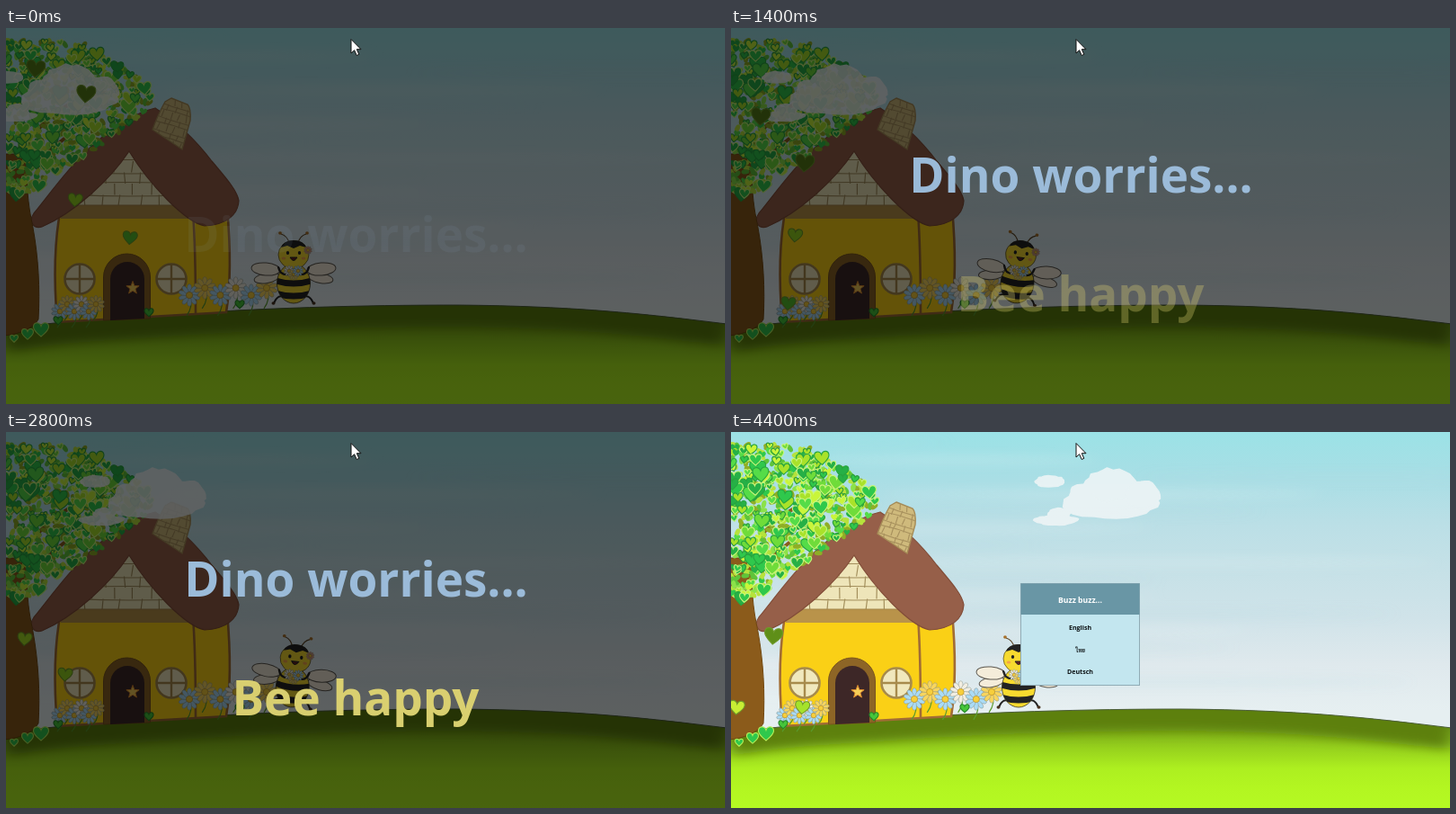
Recreate the animation shown at these times as an HTML page. Size 800 by 418 pixels, loop 4.5 s.

```html
<!DOCTYPE html>
<html lang="en">
<head>
<meta charset="utf-8">
<title>Bee happy</title>
<style>
  html, body { margin: 0; width: 100%; height: 100%; overflow: hidden; background: #c4e1e7; }
  svg { display: block; width: 800px; height: 418px; }
  text { font-family: "Open Sans", "Noto Sans", sans-serif; font-weight: 700; text-anchor: middle; }
  .big { font-size: 53px; }
  .item { font-size: 7.1px; fill: #0d1214; }
</style>
</head>
<body>
<svg id="stage" viewBox="0 0 800 418" xmlns="http://www.w3.org/2000/svg"></svg>
<script>
const LOOP = 4500, STEP = 100, CUT = 3500, SECOND = 1000, FLOOR = 306;
const BLUE = '#aadbf5', WHITE = '#f2eee2', GOLD = '#f8d55e';
const GREENS = ['#2fc84c', '#55dc48', '#a9e22a', '#c9f53a', '#6fdc3a', '#26b046'];
const stage = document.getElementById('stage');

let seed = 11;
const rnd = (a = 0, b = 1) => a + (b - a) * (seed = (seed * 16807) % 2147483647) / 2147483647;
const pick = list => list[Math.floor(rnd(0, list.length))];
const many = (n, make) => Array.from({ length: n }, (_, i) => make(i)).join('');

const path = (d, fill, stroke = 'none', w = 1, more = '') =>
  `<path d="${d}" fill="${fill}" stroke="${stroke}" stroke-width="${w}" ${more}/>`;
const oval = (x, y, rx, ry, fill, stroke = 'none', w = 1, more = '') =>
  `<ellipse cx="${x}" cy="${y}" rx="${rx}" ry="${ry}" fill="${fill}" stroke="${stroke}" stroke-width="${w}" ${more}/>`;
const rect = (x, y, w, h, fill, more = '') =>
  `<rect x="${x}" y="${y}" width="${w}" height="${h}" fill="${fill}" ${more}/>`;
const label = (x, y, s, cls, more = '') => `<text x="${x}" y="${y}" class="${cls}" ${more}>${s}</text>`;
const clip = (id, d) => `<clipPath id="${id}"><path d="${d}"/></clipPath>`;
const grad = (id, y1, y2, colors) =>
  `<linearGradient id="${id}" gradientUnits="userSpaceOnUse" x1="0" x2="0" y1="${y1}" y2="${y2}">` +
  colors.map((c, i) => `<stop offset="${i / (colors.length - 1)}" stop-color="${c}"/>`).join('') + '</linearGradient>';

const CREST = 'M-2 336C60 325 110 323 160 320C280 311 400 308 500 308C640 309 720 319 802 329';
const HILL = CREST + 'V420H-2Z';
const GABLE = 'M137 135L76 197H200Z';
const CHIMNEY = 'M184 78L202 85Q206 89 205 103L196 135L163 113Q169 96 177 82Z';
const HEART = 'M0 .95C-.45 .55-1 .15-1-.32C-1-.98-.2-1.02 0-.42C.2-1.02 1-.98 1-.32C1 .15 .45 .55 0 .95Z';

const heart = (x, y, r, fill, line = 'none', turn = 0) =>
  `<path d="${HEART}" transform="translate(${x} ${y}) rotate(${turn}) scale(${r})" fill="${fill}" stroke="${line}" stroke-width="${1.1 / r}"/>`;

function flower(x, y, r, color) {
  const petals = many(10, i =>
    oval(0, -r * .62, r * .2, r * .4, color, '#8a958c', .5, `transform="rotate(${i * 36})"`));
  return `<g transform="translate(${x} ${y})">${petals}${oval(0, 0, r * .3, r * .3, '#f7cf3c', '#b98a20', .6)}</g>`;
}

function sky() {
  const streaks = many(16, i =>
    oval(rnd(0, 800), 12 + i * 19, rnd(150, 350), 4, i % 2 ? '#edf5f6' : '#b4d9e2', 'none', 0, 'opacity=".25"'));
  return rect(0, 0, 800, 418, 'url(#sky)') + `<g filter="url(#soft)">${streaks}</g>`;
}

// The shade under the crest follows its curve.
function hill() {
  return path(HILL, 'url(#hill)') +
    `<g clip-path="url(#ground)">${path(CREST, 'none', '#5d8011', 48, 'filter="url(#soft)"')}</g>` +
    path(CREST, 'none', '#4c5d3c', 1);
}

function bricks(x0, y0, cols, rows, w, h, line) {
  return many(rows, r => {
    const y = y0 + r * h;
    return path(`M${x0} ${y}q${cols * w / 2} ${r % 2 ? 3 : -3} ${cols * w} 0` +
      many(cols, c => `M${x0 + (c + r % 2 / 2) * w + rnd(0, 5)} ${y}l${rnd(-2, 2)} ${h}`), 'none', line, 1.2);
  });
}

const windowAt = (x, y) => oval(x, y, 16.5, 16.5, '#f0e8bd', '#a78b4c', 2.6) +
  path(`M${x - 16} ${y}h32M${x} ${y - 16}v32`, 'none', '#a78b4c', 2.4);

function star(x, y, r) {
  const pts = Array.from({ length: 10 }, (_, i) => {
    const a = i * Math.PI / 5 - Math.PI / 2, k = i % 2 ? r * .42 : r;
    return `${x + k * Math.cos(a)} ${y + k * Math.sin(a)}`;
  });
  return path('M' + pts.join('L') + 'Z', '#f6cf58', '#d8862c', 1);
}

function house() {
  const wall = '#a16c35', arch = (x, top, w) => `M${x} 325V${top + w / 2}a${w / 2} ${w / 2} 0 0 1 ${w} 0V323Z`;
  return path('M61 200C54 235 53 280 57 327L211 318L245 316C250 285 250 245 246 200Z', '#fad016', wall, 2.6) +
    path('M208 205C211 245 211 285 211 318', 'none', wall, 2.6) +
    rect(61, 197, 147, 15, '#b9934a') +
    path(GABLE, '#eee5b9') + `<g clip-path="url(#gable)">${bricks(74, 148, 6, 4, 21, 12.5, '#a38f5c')}</g>` +
    path('M76 197H200', 'none', '#a3854a') +
    path('M40 221C30 224 25 214 31 206C52 180 72 152 100 127C122 108 145 94 166 89C185 101 209 122 229 148' +
      'C244 166 257 180 259 192C258 208 245 219 221 220C200 216 160 175 137 137C115 170 75 206 40 221Z', '#965f49', '#824d38', 1.2) +
    path(CHIMNEY, '#cfba7c', '#a58b56', 1.4) +
    `<g clip-path="url(#chimney)"><g transform="rotate(17 184 105)">${bricks(158, 79, 6, 8, 10, 7.5, '#a9925e')}</g></g>` +
    path(arch(108.5, 251, 52), '#8d6526', '#79541d') + path(arch(116, 260, 38), '#3d2727') +
    star(141, 289, 7.5) + windowAt(82, 279) + windowAt(184, 279);
}

function bed(x, width, n, y, r) {
  return many(n, i => {
    const fx = x + width * i / (n - 1), fy = y + (i % 2 ? -4 : 4);
    return path(`M${fx} ${fy}q5 ${r} -3 ${r * 1.9}`, 'none', '#5b9a2e', 1.2) +
      flower(fx, fy, r, [BLUE, GOLD, BLUE, WHITE][i % 4]);
  });
}

function garden() {
  return bed(60, 40, 6, 311, 9.5) + bed(204, 86, 6, 293, 12) +
    many(3, i => heart(39 - i * 15, 335 + i * 5, 8.5 - i * 2, '#2fc84c', '#b8f05a')) +
    many(3, i => heart(58 + i * 101, 325 - i * 9, 5, '#46c63a', '#25862a'));
}

// Right edge of the leaves at height y.
const reach = y => y < 85 ? 162 - 96 * ((85 - y) / 75) ** 2 : 162 - 150 * ((y - 85) / 107) ** 1.1;

function foliage(n, make) {
  return many(n, () => {
    let x, y;
    do { x = rnd(0, 162); y = rnd(12, 188); } while (x > reach(y));
    return make(x, y);
  });
}

function tree() {
  return path('M-2 140H24C22 170 24 195 30 222C36 255 38 290 36 324C30 334 16 340 -2 342Z', '#8b5b1b', '#70470f') +
    path('M8 165C16 135 35 105 70 85M20 170C35 140 68 125 95 96', 'none', '#8b5b1b', 4) +
    foliage(420, (x, y) => oval(x, y, 4.5, 2.6, pick(['#8fae26', '#8be24a', '#b6e23c', '#5fc43a']), 'none', 0,
      `transform="rotate(${rnd(0, 180)} ${x} ${y})"`)) +
    foliage(230, (x, y) => heart(x, y, rnd(3, 5), pick(GREENS), pick(['none', '#c9f57a', '#2a9a3c']), rnd(-15, 15))) +
    foliage(75, (x, y) => heart(x, y, rnd(5, 9), pick(GREENS), pick(['#c9f57a', '#27a43f']), rnd(-8, 8)));
}

function bee() {
  const ink = '#232323', yellow = '#f7da2f', wing = '#f4ecda';
  const side = s => `<g transform="translate(320 0) scale(${s} 1)">` +
    oval(30, 278, 14, 5.5, wing, '#5d5850', 1, 'transform="rotate(10 30 278)"') +
    oval(31, 268, 16, 7, wing, '#5d5850', 1, 'transform="rotate(-5 31 268)"') +
    path('M11 299Q18 296 22 306', 'none', ink, 2) + oval(22.5, 306, 2, 1.7, '#4a3320') +
    path('M5 239Q7 231 14 229', 'none', '#5a4325', 1.2) + oval(15, 228, 1.9, 1.7, '#a8702a') + '</g>';
  const face = s => oval(320 + s * 6.5, 250, 1.7, 2.1, ink) + oval(320 + s * 11, 256, 2.4, 1.6, '#f3a54a') +
    path(`M${320 + s * 17} 266q${-s * 2} 9 ${-s * 11} 8`, 'none', ink, 2.2, 'stroke-linecap="round"');
  const stripe = y => path(`M299 ${y}q21 7 42 0v7q-21 7 -42 0Z`, ink);
  return side(-1) + side(1) +
    oval(320, 284, 18.5, 22, yellow, '#3b351d', .8) +
    `<g clip-path="url(#belly)">${stripe(277)}${stripe(291)}</g>` +
    oval(320, 252, 17, 15.5, yellow, '#4a421e', .7) +
    path('M306 244Q309 236 320 236Q331 236 334 244L327 242L320 245L313 242Z', ink) +
    face(-1) + face(1) + path('M316 255Q320 262 324 255Z', '#6b2020', ink) +
    flower(336, 247, 4.5, '#e98b6a') +
    many(3, i => flower(315 + i * 5, 270 + i % 2 * 4, 6, [WHITE, GOLD, BLUE][i]));
}

// Ragged ellipse.
function puff(x, y, rx, ry) {
  const n = 26, pts = Array.from({ length: n }, (_, i) => {
    const a = i / n * 2 * Math.PI, k = rnd(.9, 1.06);
    return `${x + rx * k * Math.cos(a)} ${y + ry * k * Math.sin(a)}`;
  });
  return path('M' + pts.join('L') + 'Z', '#f0f5f6', '#f0f5f6', 2, 'stroke-linejoin="round"');
}

function cloud() {
  return puff(404, 79, 54, 17) + puff(404, 59, 28, 18) + puff(440, 70, 19, 16) + puff(372, 70, 13, 12) +
    puff(337, 55, 16, 6) + puff(344, 98, 24, 5) + puff(347, 92, 12, 7);
}

function menu() {
  return rect(322.5, 168.5, 132, 113, '#c3e6ef', 'stroke="#8fabb5"') +
    rect(322.5, 168.5, 132, 34.5, '#6996a5') +
    label(388.5, 190, 'Buzz buzz...', '', 'font-size="8.6" fill="#fff"') +
    ['English', 'ไทย', 'Deutsch'].map((s, i) => label(388.5, 220 + i * 24.6, s, 'item')).join('');
}

// Drifting leaves: start in ms, life in ms, start point, speed in px/s.
const leaf = (color, r, from, life, x, y, vx, vy) => ({ color, r, from, life, x, y, vx, vy });
const leaves = [
  leaf('#93d620', 8, 0, CUT, 77, 191, -4, 28),
  leaf('#55c22c', 8, 0, CUT, 138, 233, -53, 72),
  leaf('#567d16', 10.5, 0, 1500, 89, 73, -5, 55),
  leaf('#567d16', 10.5, 0, 1500, 33, 45, 0, 38),
  leaf('#a6df25', 8, 2600, 900, 26, 214, -26, 80),
  leaf('#5f8f18', 10, CUT, 1000, 49, 187, -2, 44),
  leaf('#c8ee34', 8.5, CUT, 1000, 28, 234, -24, 82),
  leaf('#a5e32b', 8, CUT, 1000, 83, 291, -4, 34)
];

stage.innerHTML = '<defs>' +
  grad('sky', 0, 310, ['#9be2e6', '#a9dee5', '#bbdfe6', '#c6e1e7', '#d0e3e9', '#dfe9ed', '#e6eff1']) +
  grad('hill', 308, 418, ['#6a9415', '#7cac18', '#97d21d', '#adef20', '#b3f621', '#b5f923']) +
  '<filter id="soft" filterUnits="userSpaceOnUse" x="-50" y="-50" width="900" height="520"><feGaussianBlur stdDeviation="9 6"/></filter>' +
  clip('gable', GABLE) + clip('chimney', CHIMNEY) + clip('ground', HILL) +
  '<clipPath id="belly"><ellipse cx="320" cy="284" rx="18.5" ry="22"/></clipPath></defs>' +
  sky() + hill() + house() + tree() + garden() +
  `<g id="bee">${bee()}</g><g id="cloud" opacity=".86">${cloud()}</g>` +
  leaves.map((l, i) => `<g id="leaf${i}">${heart(0, 0, l.r, l.color, '#6f9a2a', 6)}</g>`).join('') +
  `<g id="intro">${rect(0, 0, 800, 418, '#000', 'opacity=".6"')}` +
  label(389.5, 183, 'Dino worries...', 'big', 'id="first" fill="#9bbbd9"') +
  label(389, 315, 'Bee happy', 'big', 'id="second" fill="#d9cf70"') + '</g>' +
  `<g id="menu">${menu()}</g>` +
  path('M384 12.5V28L387.6 24.7L390.2 30.5L392.8 29.3L390.3 23.7H395Z', '#fff', '#111');

const set = (id, attrs) => Object.entries(attrs).forEach(([k, v]) => document.getElementById(id).setAttribute(k, v));
const clamp = v => Math.max(0, Math.min(1, v));

function draw(t) {
  const intro = t < CUT;
  set('intro', { display: intro ? 'inline' : 'none' });
  set('menu', { display: intro ? 'none' : 'inline' });
  set('first', { opacity: 1 - .93 * Math.exp(-t / 250), y: t < SECOND ? 249 : 183 });
  set('second', { opacity: Math.sin(clamp((t - SECOND) / 1900) * Math.PI / 2) });

  const drift = intro ? -334 + t * .0345 : (t - 3900) * .036;
  set('cloud', { transform: `translate(${drift} 0)` });

  const sway = 8 * Math.abs(Math.sin(t / 2200 * Math.PI));
  set('bee', { transform: `rotate(${sway} 320 272)` });

  leaves.forEach((l, i) => {
    const age = t - l.from, s = age / 1000;
    set('leaf' + i, {
      transform: `translate(${l.x + l.vx * s} ${Math.min(FLOOR, l.y + l.vy * s)})`,
      display: age >= 0 && age < l.life ? 'inline' : 'none'
    });
  });
}

const start = performance.now();
function tick() {
  const t = (performance.now() - start) % LOOP;
  draw(Math.floor(t / STEP) * STEP);
  requestAnimationFrame(tick);
}
tick();
</script>
</body>
</html>
```
